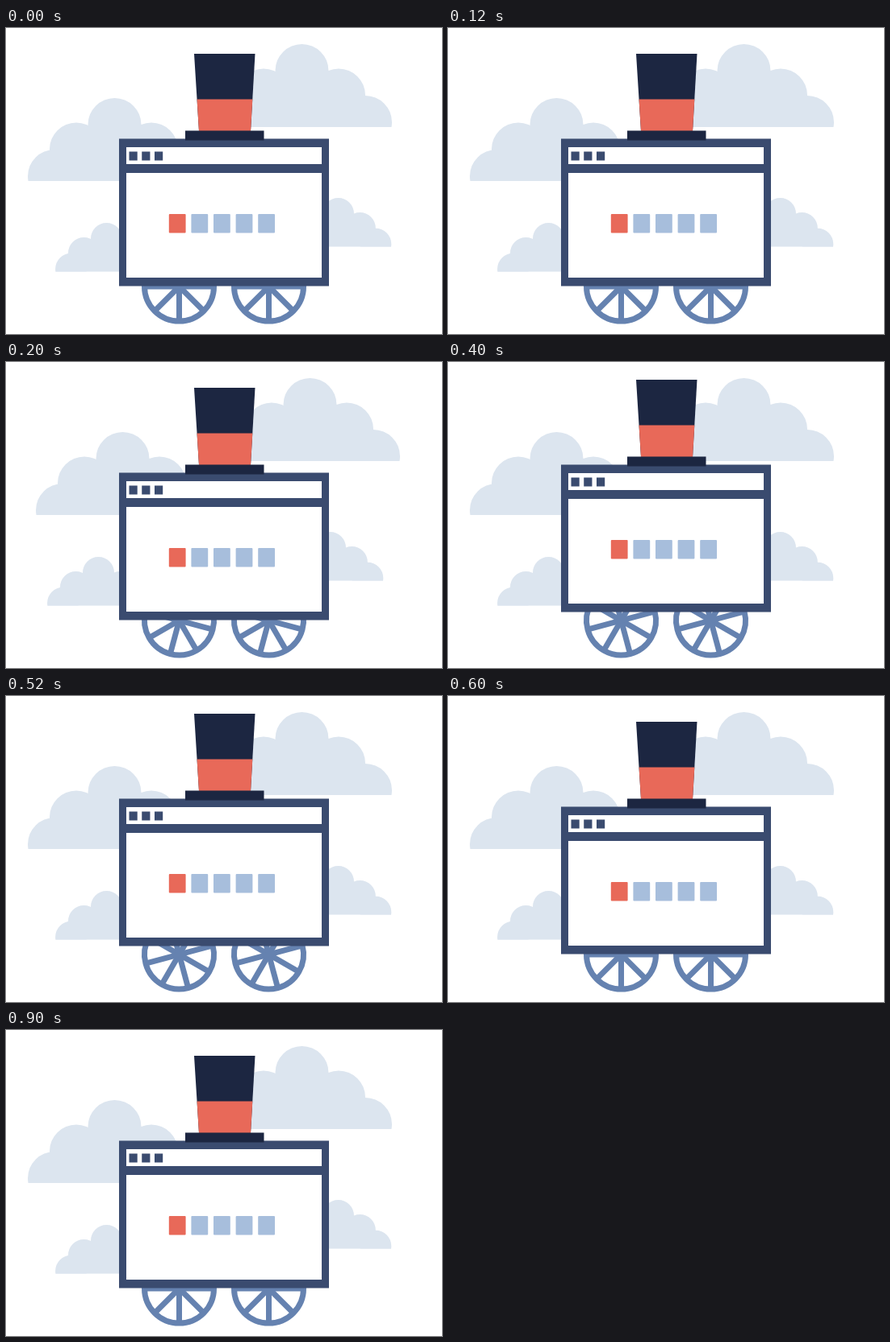
Animation, 540 px wide and 380 px high, one loop 1100 ms. Source, as an HTML page with a canvas:

```html
<!DOCTYPE html>
<html lang="en">
<head>
<meta charset="utf-8">
<title>Rolling browser</title>
<style>
html, body { margin: 0; width: 100%; height: 100%; overflow: hidden; background: #fff; }
canvas { display: block; width: 540px; height: 380px; }
</style>
</head>
<body>
<canvas id="stage" width="540" height="380"></canvas>
<script>
const ctx = document.getElementById('stage').getContext('2d');
const LOOP = 1100;
const STEP = 200;
const CLOUD = '#dce5ef', FRAME = '#3a4b6f', WHEEL = '#6582b0';
const HAT = '#1c2641', RED = '#e86959', TILE = '#a7bedc';

// Each pose: cloud drift, body lift, wheel turn in degrees.
const poses = [
  { drift: 0, lift: 0, turn: 0 },
  { drift: 10, lift: 0, turn: 15 },
  { drift: 0, lift: 10, turn: 30 },
  { drift: 0, lift: 0, turn: 0 }
];

function box(color, x, y, w, h) {
  ctx.fillStyle = color;
  ctx.fillRect(x, y, w, h);
}

function poly(color, points) {
  ctx.fillStyle = color;
  ctx.beginPath();
  for (const [x, y] of points) ctx.lineTo(x, y);
  ctx.fill();
}

// x, y is the centre of the top bump.
function cloud(x, y, scale) {
  ctx.save();
  ctx.translate(x, y);
  ctx.scale(scale, scale);
  ctx.beginPath();
  ctx.rect(-120, -40, 240, 110);
  ctx.clip();
  ctx.fillStyle = CLOUD;
  ctx.beginPath();
  for (const [bx, by] of [[-74.5, 64], [-47.5, 30.5], [0, 0], [45.5, 30.5], [78.5, 64]]) {
    ctx.moveTo(bx + 33, by);
    ctx.arc(bx, by, 33, 0, Math.PI * 2);
  }
  ctx.rect(-74.5, 31, 153, 39);
  ctx.rect(-47, 13, 92, 57);
  ctx.fill();
  ctx.restore();
}

function wheel(x, y, degrees) {
  ctx.save();
  ctx.translate(x, y);
  ctx.rotate(degrees * Math.PI / 180);
  ctx.strokeStyle = WHEEL;
  ctx.lineWidth = 7;
  ctx.beginPath();
  ctx.arc(0, 0, 43, 0, Math.PI * 2);
  ctx.stroke();
  for (let i = 0; i < 4; i++) {
    ctx.beginPath();
    ctx.moveTo(-42, 0);
    ctx.lineTo(42, 0);
    ctx.stroke();
    ctx.rotate(Math.PI / 4);
  }
  ctx.restore();
}

function browser() {
  box(FRAME, 140, 137.5, 260, 183);
  box('#fff', 149, 148, 242, 21);
  box('#fff', 149, 180, 242, 130);
  for (let i = 0; i < 3; i++) box(FRAME, 152.5 + i * 15.75, 153.5, 10.2, 11);
  for (let i = 0; i < 5; i++) {
    ctx.fillStyle = i ? TILE : RED;
    ctx.beginPath();
    ctx.roundRect(201.8 + i * 27.6, 231, 20.8, 23.5, 1);
    ctx.fill();
  }
}

function hat() {
  poly(HAT, [[233, 32], [308.5, 32], [303, 128], [239, 128]]);
  poly(RED, [[236.5, 88.5], [305.3, 88.5], [303, 128], [239, 128]]);
  box(HAT, 222, 127.5, 97.5, 12);
}

function draw({ drift, lift, turn }) {
  box('#fff', 0, 0, 540, 380);
  cloud(134.5 + drift, 120, 1);
  cloud(366.5 + drift, 53, 1);
  cloud(124.5 - drift, 261.5, 0.59);
  cloud(411.5 - drift, 230.5, 0.59);
  wheel(214.5, 321, turn);
  wheel(325.5, 321, turn);
  ctx.save();
  ctx.translate(0, -lift);
  browser();
  hat();
  ctx.restore();
}

const start = performance.now();
function tick() {
  const t = (performance.now() - start) % LOOP;
  draw(poses[Math.min(3, Math.floor(t / STEP))]);
  requestAnimationFrame(tick);
}
tick();
</script>
</body>
</html>
```
